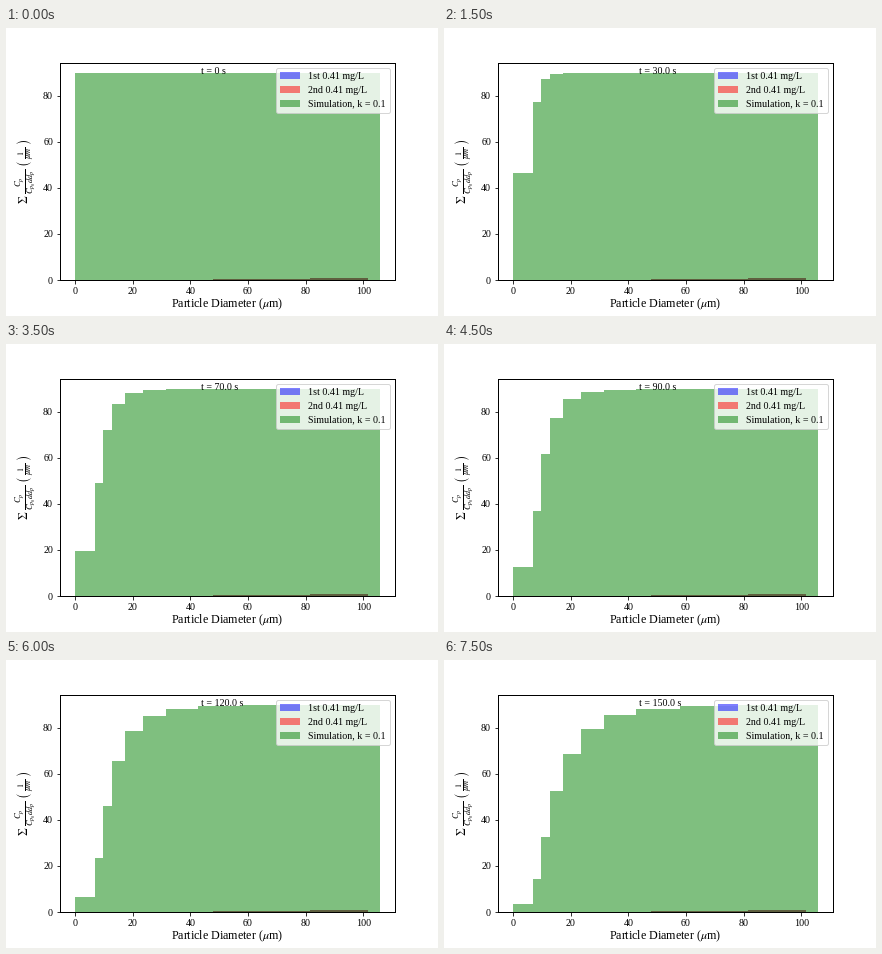
A matplotlib script that plays this animation: 432x288 px, repeating every 8 s.

```python
import numpy as np
import matplotlib.pyplot as plt
from matplotlib.animation import FuncAnimation

plt.rcParams.update({
    "font.family": "Liberation Serif",
    "mathtext.fontset": "stix",
    "font.size": 10,
    "axes.labelsize": 12,
    "axes.linewidth": 1,
})

FRAMES = 16
STEP = 10            # simulated seconds per frame
START = 89.975       # initial level of every size bin
RATE = 0.02194       # transfer from each bin to the next, per second
D_MAX, RATIO, BINS = 105.7, 1.3517, 10

edges = np.append(0, D_MAX / RATIO ** np.arange(BINS - 1, -1, -1))


def levels(t):
    """Chain of equal first-order steps: cumulative Poisson terms."""
    n = np.arange(1, BINS)
    terms = np.append(1, np.cumprod(RATE * t / n))
    return START * np.exp(-RATE * t) * np.cumsum(terms)


fig, ax = plt.subplots(figsize=(6, 4), dpi=72)
fig.subplots_adjust(left=0.125, right=0.9, bottom=0.125, top=0.88)


def draw_bars(bounds, heights, color, label):
    return ax.bar(bounds[:-1], heights, np.diff(bounds), align="edge",
                  color=color, alpha=0.5, label=label)


measured = np.array([47.8, 81.4, 101.7])
draw_bars(measured, [0.4, 0.85], "blue", "1st 0.41 mg/L")
draw_bars(measured, [0.4, 0.85], "red", "2nd 0.41 mg/L")
bars = draw_bars(edges, levels(0), "green", "Simulation, k = 0.1")

ax.set_xlim(-0.05 * D_MAX, 1.05 * D_MAX)
ax.set_ylim(0, 94.5)
ax.set_xticks(range(0, 101, 20))
ax.set_yticks(range(0, 81, 20))
ax.set_xlabel(r"Particle Diameter ($\mu$m)", labelpad=1)
ax.set_ylabel(r"$\Sigma\ \frac{C_p}{C_{p_0}dd_p}\ "
              r"\left(\:\frac{1}{\mu m}\:\right)$")
ax.legend(loc="upper right", fontsize=10)
clock = ax.text(0.42, 0.9475, "", transform=ax.transAxes)


def update(i):
    t = i * STEP
    for bar, height in zip(bars, levels(t)):
        bar.set_height(height)
    clock.set_text(f"t = {t:.1f} s" if t else "t = 0 s")
    return [*bars, clock]


anim = FuncAnimation(fig, update, frames=FRAMES, interval=500,
                     repeat=True, repeat_delay=0)
plt.show()
```
